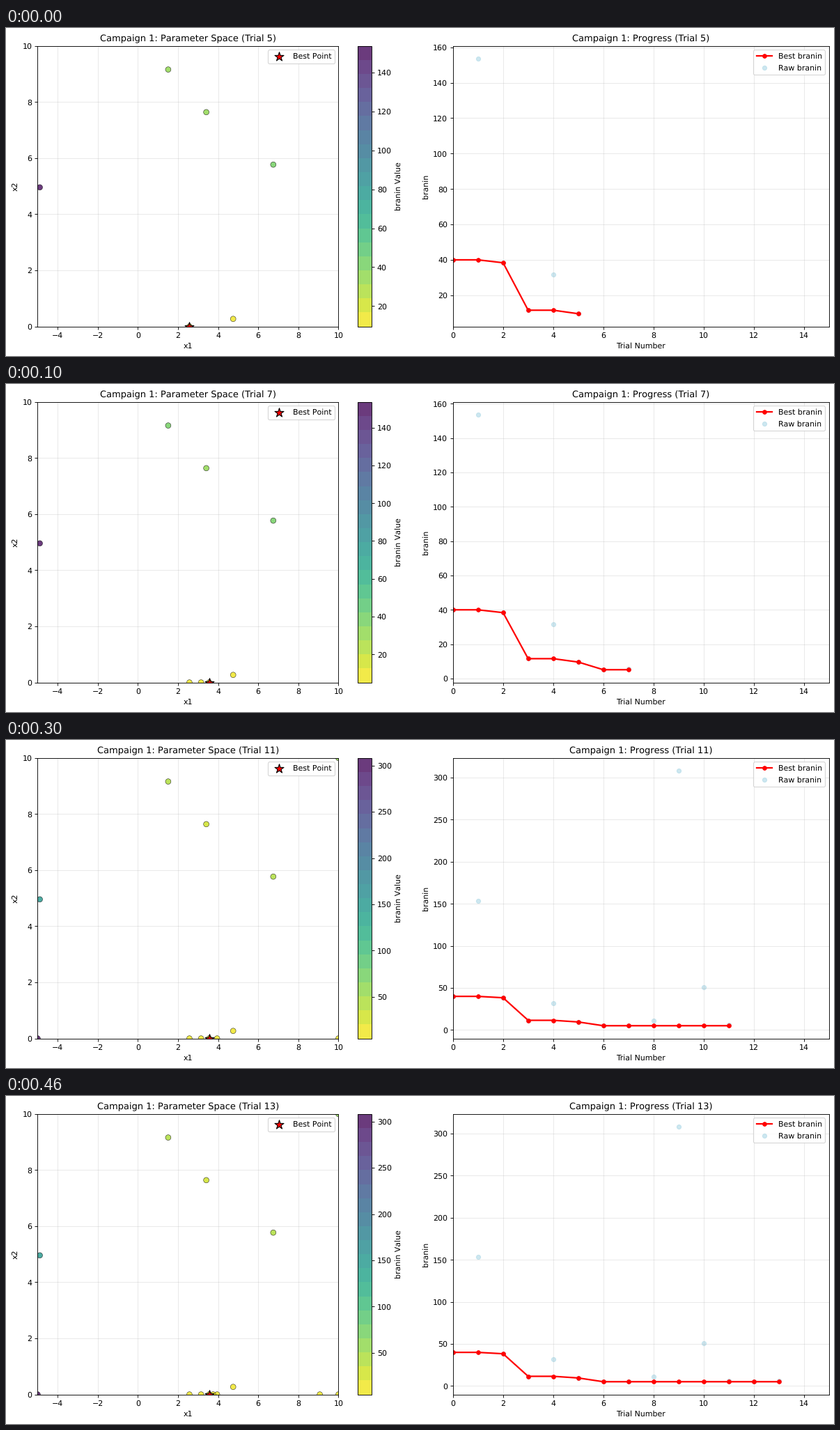
Write a matplotlib script that moves like this. It is 1189 by 471 pixels and loops after 500 ms.

```python
import numpy as np
import matplotlib.pyplot as plt
from matplotlib.animation import FuncAnimation
from matplotlib.colors import ListedColormap

W, H, DPI = 1189, 471, 80
BOTTOM, TOP = 42.4, 445.2

# Sampled (x1, x2) in trial order.
TRIALS = np.array([
    (6.75, 5.77), (-4.89, 4.96), (1.51, 9.16), (4.75, 0.27), (3.41, 7.64),
    (2.57, 0), (3.55, 0), (3.15, 0), (10, 0), (-5, 0),
    (10, 10), (3.95, 0), (3.75, 0), (9.07, 0),
])
BANDS = 20
CMAP = ListedColormap(
    plt.get_cmap("viridis_r")((np.arange(BANDS) + 0.5) / BANDS))

plt.rcParams.update({
    "font.family": "DejaVu Sans",
    "font.size": 10,
    "text.hinting": "no_hinting",
    "text.hinting_factor": 1,
})


def branin(x1, x2):
    bowl = x2 - 5.1 / (4 * np.pi**2) * x1**2 + 5 / np.pi * x1 - 6
    return bowl**2 + 10 * (1 - 1 / (8 * np.pi)) * np.cos(x1) + 10


VALUES = branin(*TRIALS.T)
BEST = np.minimum.accumulate(VALUES)

fig = plt.figure(figsize=(W / DPI, H / DPI), dpi=DPI, facecolor="white")


def panel(left, right):
    return fig.add_axes(
        [left / W, BOTTOM / H, (right - left) / W, (TOP - BOTTOM) / H])


def dress(ax, title, xlabel, ylabel):
    ax.set(title=title, xlabel=xlabel, ylabel=ylabel)
    ax.grid(True, alpha=0.3)
    ax.legend(loc="upper right")


def draw_space(last):
    ax = panel(45.4, 477.4)
    x1, x2 = TRIALS[:last + 1].T
    values = VALUES[:last + 1]
    dots = ax.scatter(x1, x2, c=values, cmap=CMAP, s=50, alpha=0.8,
                      edgecolors="black", linewidths=0.5)
    top = values.argmin()
    ax.scatter(x1[top], x2[top], c="red", marker="*", s=150,
               edgecolors="black", linewidths=1, label="Best Point", zorder=2)
    ax.set(xlim=(-5, 10), ylim=(0, 10))
    dress(ax, f"Campaign 1: Parameter Space (Trial {last})", "x1", "x2")
    fig.colorbar(dots, cax=panel(505, 525), label="branin Value")


def draw_progress(last):
    ax = panel(641.8, 1181.9)
    trials = np.arange(last + 1)
    ax.plot(trials, BEST[:last + 1], "o-", color="red", linewidth=2,
            markersize=5, label="Best branin")
    ax.scatter(trials, VALUES[:last + 1], color="lightblue", s=30, alpha=0.6,
               label="Raw branin")
    ax.set_xlim(0, 15)
    dress(ax, f"Campaign 1: Progress (Trial {last})", "Trial Number", "branin")


def update(step):
    fig.clear()
    last = 5 + 2 * step
    draw_space(last)
    draw_progress(last)
    return []


anim = FuncAnimation(fig, update, frames=5, interval=100, repeat=True,
                     repeat_delay=0, init_func=lambda: [], blit=False)
plt.show()
```
